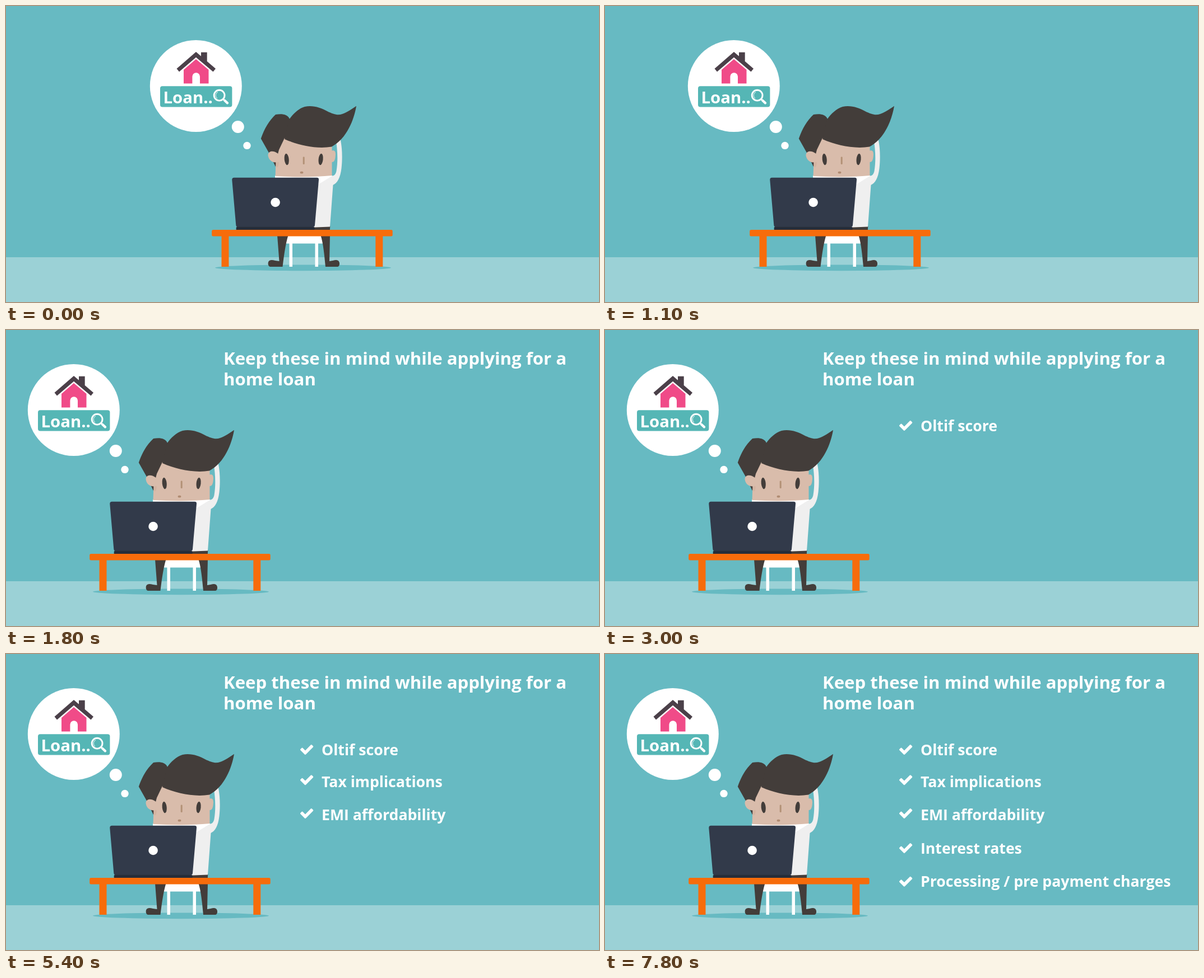
An HTML page for the animation above (9300 ms loop, 1058 px wide and 529 px high).

```html
<!DOCTYPE html>
<html lang="en">
<head>
<meta charset="utf-8">
<title>Home loan checklist</title>
<style>
  html, body { margin: 0; width: 100%; height: 100%; overflow: hidden; background: #67bac2; }
  svg { display: block; width: 100%; height: 100%; }
  text { font-family: "Open Sans", sans-serif; font-weight: 700; fill: #fff; }
  .dark { fill: #433d3a; }
  .skin { fill: #d9bcab; }
  .white { fill: #fff; }
  .shirt { fill: #efefef; }
  .desk { fill: #f76c0b; }
  .roof { fill: #4b4049; }
</style>
</head>
<body>
<svg viewBox="0 0 1058 529">
  <defs>
    <path id="check" class="white" transform="translate(-1.8 -13.9) scale(.015)"
      d="M1671 566q0 40-28 68l-860 860q-28 28-68 28t-68-28l-498-498q-28-28-28-68t28-68l136-136q28-28 68-28t68 28l294 295 656-657q28-28 68-28t68 28l136 136q28 28 28 68z"/>
  </defs>

  <rect width="1058" height="529" fill="#67bac2"/>
  <rect y="449" width="1058" height="80" fill="#9bd1d6"/>

  <g id="scene">
    <!-- thought bubble -->
    <g class="white">
      <circle cx="338.8" cy="143" r="82"/>
      <circle cx="413.8" cy="216" r="11"/>
      <circle cx="430" cy="249.4" r="6.7"/>
    </g>
    <path fill="#f04b88" d="M339 95L361.5 114V138.5H346V126A6.8 6.8 0 0 0 332.400 126V138.500H317V114Z"/>
    <path class="roof" d="M348 82.700H358.700V101L348 92ZM339 82L374 112L369.500 117.500L339 91.700L309 117.500L304.500 112Z"/>
    <rect x="275" y="143.200" width="128.400" height="37.200" rx="4" fill="#55b6b5"/>
    <text x="280.500" y="173.800" font-size="29.300">Loan..</text>
    <g fill="none" stroke="#fff">
      <circle cx="380.600" cy="159.700" r="9.400" stroke-width="2.900"/>
      <path d="M378 153.800A6.500 6.500 0 0 0 377 165" stroke-width="1"/>
      <path d="M387.500 166.500L390 169" stroke-width="2.500"/>
      <path d="M390 168.700L395 173.400" stroke-width="4.300" stroke-linecap="round"/>
    </g>

    <!-- person -->
    <ellipse cx="530" cy="467.800" rx="157" ry="5.400" fill="#67bac2"/>
    <path class="white" d="M502 411H562L566 424.500H557V466H551.500V424.500H511V466H505.500V424.500H498Z"/>
    <path class="dark" d="M484 410H503.500C499 424 496 445 493.500 466H471C467 465 466.500 457 470 455C475 452.500 480 456 487.500 456Z"/>
    <path class="dark" d="M561.500 410H578L577 456C583 456 588 452.500 592.500 455C596 457 596 465 592 466H570C568 445 566 424 561.500 410Z"/>
    <path class="dark" d="M540 393H578.300L577.800 401H540Z"/>
    <path class="shirt" d="M540 304H583L586 316L583.500 320L578 394.500L540 396Z"/>
    <path class="shirt" d="M580 304C586 304 588.500 300 589.500 295C592 280 592 262 589 242L595.500 234C600 250 600.500 272 598.500 290C596.500 307 591 317 583 320L574 312Z"/>
    <path class="white" d="M480 303H583L557 319L540 322H480Z"/>
    <path class="dark" d="M454.800 237C461 219 470 204 481 194C491 192 503 193 506 202L520 240L490 275L480.800 287L470 264Z"/>
    <path class="skin" d="M497 236L487 257L481.500 278L480.500 304C515 306 550 306 581.500 303V279C585 279 587 276 587.700 269C588.700 261 587 257 581.500 258.500V248Z"/>
    <path class="skin" d="M485.500 264C477 257 467 259 467.500 267C468.500 275 475 281 484 279Z"/>
    <ellipse cx="484.500" cy="283.500" rx="2" ry="5" fill="#cfac98" opacity=".5" transform="rotate(15 484.500 283.500)"/>
    <path class="dark" d="M505 203C512 193 522 183 533 180C548 177 562 182 573 188C584 193.500 592 196 600 193C609 190 617 184 625 178.700C621 203 608 237 581 251.500C554 256 522 249 497 238Z"/>
    <ellipse class="dark" cx="500.700" cy="274" rx="4" ry="10.200" transform="rotate(-6 500.700 274)"/>
    <ellipse class="dark" cx="561.600" cy="274" rx="4" ry="10.200" transform="rotate(6 561.600 274)"/>
    <rect x="529.700" y="269.500" width="3" height="13.500" rx="1.300" fill="#b39176"/>
    <rect x="524.600" y="295.800" width="5.800" height="3.600" rx="1.700" fill="#b08b72"/>

    <!-- laptop and desk -->
    <path fill="#323a4a" d="M407 306.800H554.500Q558.500 306.800 558 311L551 391.500Q550.600 395 547.500 395H413.500Q410.700 395 410.300 391.500L403.300 311Q403 306.800 407 306.800Z"/>
    <rect x="410.700" y="394.700" width="139.800" height="6" rx="1.500" fill="#262d39"/>
    <circle class="white" cx="480.600" cy="351" r="8.300"/>
    <g class="desk">
      <rect x="384.500" y="409" width="13" height="57"/>
      <rect x="659.300" y="409" width="13" height="57"/>
      <rect x="367.200" y="400" width="322.500" height="11.600" rx="2.500"/>
    </g>
  </g>

  <g id="title" font-size="31.150">
    <text x="388" y="61.500">Keep these in mind while applying for a</text>
    <text x="388" y="98.800">home loan</text>
  </g>
  <g id="items" font-size="26.650"></g>
</svg>
<script>
  const LOOP = 9300;
  const byId = id => document.getElementById(id);
  const scene = byId("scene"), title = byId("title"), list = byId("items");

  // label, text baseline, check mark centre
  const items = [
    ["Oltif score", 180.6, 171],
    ["Tax implications", 237.5, 225.2],
    ["EMI affordability", 297.2, 285],
    ["Interest rates", 356.6, 347],
    ["Processing / pre payment charges", 416.3, 406.7]
  ];
  list.innerHTML = items.map(([label, baseline, checkY]) =>
    `<g><use href="#check" x="525" y="${checkY}"/><text x="563" y="${baseline}">${label}</text></g>`
  ).join("");

  // progress in equal 100 ms steps; the first step lands at the start time
  const stepped = (t, start, steps) =>
    Math.max(0, Math.min(steps, Math.floor((t - start) / 100) + 1)) / steps;

  function draw(now) {
    const t = now % LOOP;
    scene.setAttribute("transform", `translate(${-218 * stepped(t, 1000, 4)} 0)`);
    title.setAttribute("opacity", t < 1800 ? 0 : 1);
    [...list.children].forEach((item, i) =>
      item.setAttribute("opacity", stepped(t, 2800 + 1200 * i, 3)));
    requestAnimationFrame(draw);
  }
  draw(performance.now());
</script>
</body>
</html>
```
